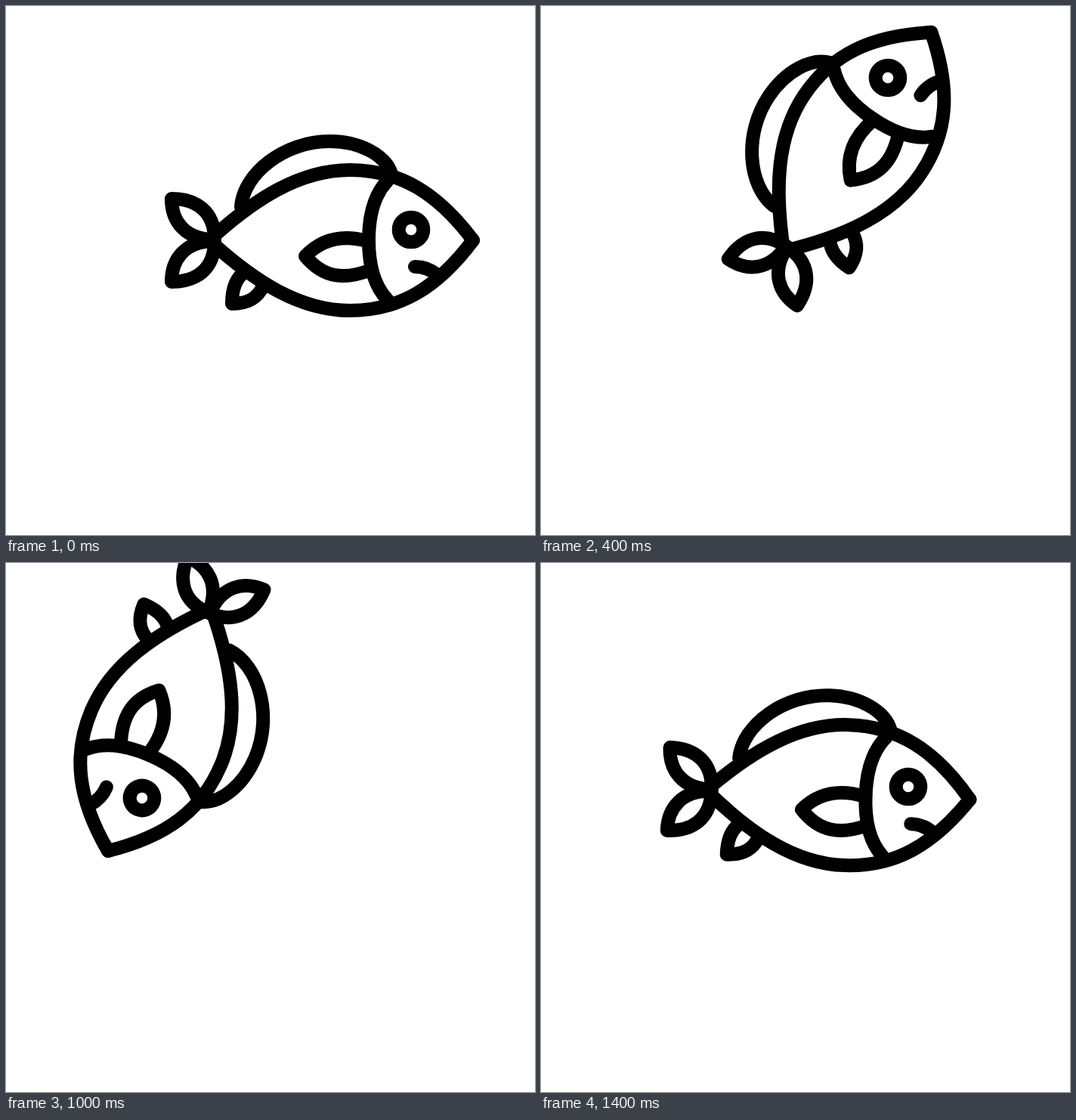
An HTML page for the animation above (1.6 s loop, 700 px wide and 700 px high).

```html
<!DOCTYPE html>
<html>
<head>
<meta charset="utf-8">
<style>
html, body { margin: 0; height: 100%; overflow: hidden; background: #fff; }
svg { display: block; width: 100%; height: 100%; }
</style>
</head>
<body>
<svg viewBox="0 0 700 700">
  <g id="fish" fill="none" stroke="#000" stroke-width="18" stroke-linecap="round" stroke-linejoin="round">
    <!-- upper half of body, tail and gill, mirrored below -->
    <g id="half">
      <path d="M269 310C330 254 390 217 455 217S570 246 618 310"/>
      <path d="M219 255C252 255 276 272 276 309C236 309 219 284 219 255Z"/>
      <path d="M505 231Q480 257 480 310"/>
    </g>
    <use href="#half" transform="translate(0 620) scale(1 -1)"/>
    <!-- fins -->
    <path d="M311 266C314 222 368 179 428 179C468 179 502 197 510 222"/>
    <path d="M316 352C304 360 299 375 299 394C318 394 332 388 340 371"/>
    <path d="M478 311C445 302 418 308 396 331C420 360 448 363 483 349"/>
    <!-- eye, mouth -->
    <circle cx="536" cy="296" r="16.3"/>
    <path d="M541 345Q558 345 571 356"/>
  </g>
</svg>
<script>
const STEP = 200;
// key poses: eye x, eye y, heading in degrees
const poses = [
  [536, 296, 0],
  [609, 172, -24],
  [459, 95, -56],
  [219, 111, -130],
  [202, 273, -200],
  [180, 311, -247],
  [306, 296, -323],
  [486, 296, -358]
];
const fish = document.getElementById('fish');

function draw(now) {
  const [x, y, turn] = poses[Math.floor(now / STEP) % poses.length];
  fish.setAttribute('transform', `translate(${x} ${y}) rotate(${turn}) translate(-536 -296)`);
}

const start = performance.now();
function tick() {
  draw(performance.now() - start);
  requestAnimationFrame(tick);
}
tick();
</script>
</body>
</html>
```
